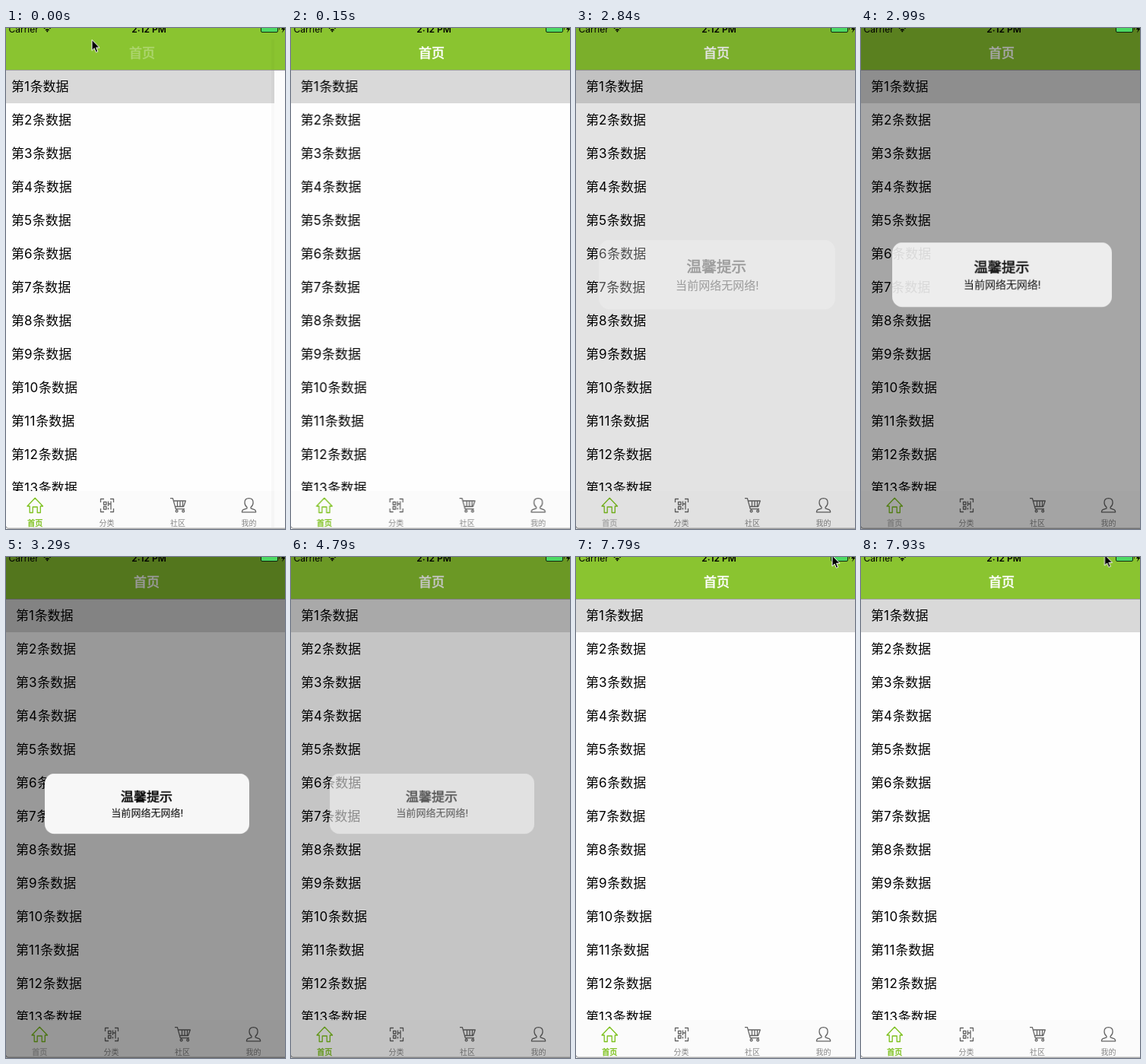
Animation of 367x659 px, one loop 8 s. Source, as an HTML page:

```html
<!DOCTYPE html>
<html lang="zh-CN">
<head>
<meta charset="utf-8">
<title>首页</title>
<style>
html, body { margin: 0; width: 100%; height: 100%; overflow: hidden; background: #fefefe; }
svg { display: block; width: 367px; height: 659px; font: 17px Inter, "Noto Sans CJK SC", "Noto Sans CJK", sans-serif; }
.mid { text-anchor: middle; }
.bold { font-weight: 600; }
/* a weight between regular and bold */
.semi { fill: currentColor; stroke: currentColor; stroke-width: .5px; }
.num { letter-spacing: .7px; }
.status { font-size: 12px; }
.icon { fill: none; stroke: #646464; stroke-width: 1.3; stroke-linejoin: round; }
.label { font-size: 10px; text-anchor: middle; }
.gray { fill: #858585; }
.home { stroke: #7cc01c; }
#homeLabel { color: #7cc01c; stroke-width: .4px; }

/* every state is held, then changes at once */
.anim { animation: 8s step-end infinite; }
#page { animation-name: slide; }
#title { color: #fff; animation-name: title; }
#edge { animation-name: edge; }
#dim { opacity: 0; animation-name: dim; }
#alert { opacity: 0; transform-origin: 185.5px 324.5px; animation-name: pop; }
#homeLabel { animation-name: tint; }
#cursor { animation-name: pointer; }

@keyframes slide {
  0% { transform: translateX(-6px); }
  1.875% { transform: translateX(-.4px); }
  3.75%, 100% { transform: none; }
}
@keyframes title {
  0% { transform: translateX(-6px); opacity: .3; }
  1.875%, 100% { transform: none; opacity: 1; }
}
@keyframes edge {
  0% { opacity: 1; }
  1.875%, 100% { opacity: 0; }
}
@keyframes dim {
  0% { opacity: 0; }
  35.5% { opacity: .106; }
  37.375% { opacity: .35; }
  39.25% { opacity: .37; }
  41.125% { opacity: .4; }
  59.875% { opacity: .224; }
  61.75% { opacity: .014; }
  97.375%, 100% { opacity: 0; }
}
@keyframes pop {
  0% { opacity: 0; transform: scale(1.156); }
  35.5% { opacity: .31; transform: scale(1.156); }
  37.375% { opacity: .88; transform: scale(1.074); }
  39.25% { opacity: 1; transform: scale(1.015); }
  41.125% { opacity: 1; transform: none; }
  59.875% { opacity: .57; transform: none; }
  61.75% { opacity: .036; transform: none; }
  97.375%, 100% { opacity: 0; transform: none; }
}
@keyframes tint {
  0% { color: #7cc01c; }
  35.5% { color: #bdbdbd; }
  59.875%, 100% { color: #7cc01c; }
}
@keyframes pointer {
  0% { opacity: 1; transform: translate(113px, 15.5px); }
  1.875% { opacity: 0; transform: translate(113px, 15.5px); }
  97.375% { opacity: 1; transform: translate(337px, -2px); }
  99.125%, 100% { opacity: 1; transform: translate(320.5px, -3px); }
}
</style>
</head>
<body>
<svg viewBox="0 0 367 659">
  <rect width="367" height="659" fill="#fefefe"/>
  <g id="page" class="anim">
    <rect x="-10" y="55" width="400" height="44" fill="#d9d9d9"/>
    <g id="rows"></g>
    <rect x="-10" y="609" width="400" height="50" fill="#fbfbfb"/>

    <path class="icon home" d="M34 629 44.2 618.2 54.5 629H51.3V637.5H47.2V630H41.2V637.5H37.2V629Z"/>
    <g class="icon">
      <path d="M130.5 624V619.5H135M143 619.5H147.5V624M147.5 632V636.5H143M135 636.5H130.5V632"/>
      <path d="M134.5 623.5H138V627H134.5ZM140.5 622.5V629M144 622.5V633.5M140.5 626H144M134.5 629.5H138V633H134.5ZM140.5 631V633.5"/>
    </g>
    <g class="icon">
      <path d="M222 618.7H225.4L229.3 632.7H241M226.4 622H242.3L239.6 629.5H228.6M231.5 622V629M235 622V629M238.5 622V629"/>
      <circle cx="230.6" cy="635.4" r="1.4"/><circle cx="239.2" cy="635.4" r="1.4"/>
    </g>
    <path class="icon" d="M325.5 618.6C321.8 618.6 320 621 320 624.2 320 627 321.2 629 323 630.2V631.8L318 633.6Q316.4 634.4 316.4 636.8H334.7Q334.7 634.4 333 633.6L328.1 631.8V630.2C329.9 629 331.1 627 331.1 624.2 331.1 621 329.2 618.6 325.5 618.6Z"/>

    <text id="homeLabel" class="label semi anim" x="44.3" y="654.6">首页</text>
    <text class="label gray" x="138.6" y="654.6">分类</text>
    <text class="label gray" x="232" y="654.6">社区</text>
    <text class="label gray" x="325.5" y="654.6">我的</text>
  </g>

  <rect width="367" height="55" fill="#8ac430"/>
  <rect y="55" width="367" height="1" opacity=".25"/>
  <text id="title" class="mid semi anim" x="185" y="39.2">首页</text>

  <g id="edge" class="anim">
    <rect x="353" y="56" width="14" height="553" fill="#fcfcfc"/>
    <rect x="349" y="15" width="4" height="642" opacity=".025"/>
  </g>
  <path d="M0 655.5Q.3 658.2 3 658.2H367" fill="none" stroke="#8c8c8c"/>

  <rect id="dim" class="anim" width="367" height="659"/>

  <g class="status">
    <text x="3.5" y="5.5">Carrier</text>
    <path d="M50 .6Q54.3-3 58.6.6M52 2.8Q54.3 1 56.6 2.8" fill="none" stroke="#000" stroke-width="1.5"/>
    <circle cx="54.3" cy="4.3" r="1.1"/>
    <text class="mid bold" x="188" y="5.7">2:12 PM</text>
    <rect x="335.5" y="-4" width="22" height="9.5" rx="1.5" fill="#4cd964" stroke="#000" stroke-width=".8"/>
    <path d="M359-1Q360.5 1 359 3ZM366-4 362 2H364.6L363 6.5 367.5.6H365Z"/>
  </g>

  <g id="alert" class="anim">
    <rect x="51" y="285" width="269" height="79" rx="12.5" fill="#f7f7f7"/>
    <text class="mid semi" x="185" y="321.3">温馨提示</text>
    <text class="mid" x="185.8" y="341" font-size="13">当前网络无网络!</text>
  </g>

  <path id="cursor" class="anim" d="M0 0V14.2L3.2 11.2 5.4 16.4 7.8 15.4 5.6 10.3H10Z" stroke="#fff" stroke-width="1"/>
</svg>
<script>
const rows = document.getElementById('rows');
const add = (tag, parent) =>
  parent.appendChild(document.createElementNS('http://www.w3.org/2000/svg', tag));

for (let i = 0; i < 13; i++) {
  const row = add('text', rows);
  row.setAttribute('x', 13);
  row.setAttribute('y', 83 + 44 * i);
  row.append('第');
  const num = add('tspan', row);
  num.setAttribute('class', 'num');
  num.textContent = i + 1;
  row.append('条数据');
}
</script>
</body>
</html>
```
